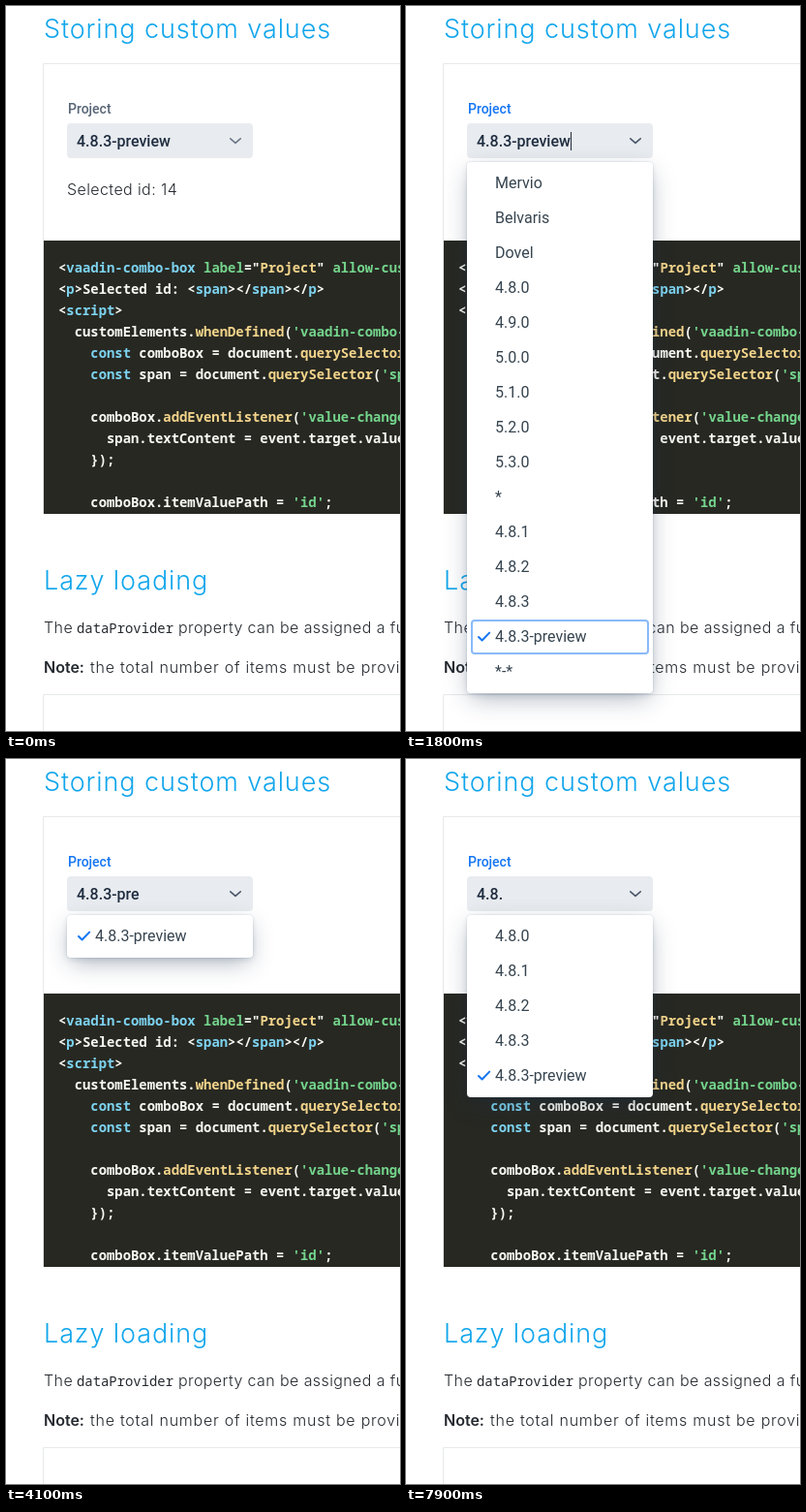
An HTML page for the animation above (8000 ms loop, 407 by 748 pixels).

```html
<!DOCTYPE html>
<html lang="en">
<head>
<meta charset="utf-8">
<title>Storing custom values</title>
<style>
html, body { margin: 0; width: 100%; height: 100%; overflow: hidden; background: #fff; }
#stage { position: relative; width: 407px; height: 748px; overflow: hidden; }
svg { position: absolute; left: 0; top: 0; }
text { white-space: pre; }
.h { font: 300 27px Inter, sans-serif; letter-spacing: .9px; fill: #12a6ec; }
.b { font: 300 16px Inter, sans-serif; letter-spacing: .4px; fill: #24292f; }
.wide { letter-spacing: .75px; }
.strong { font-weight: 600; letter-spacing: 0; }
.mono { font: 300 13.9px "Noto Sans Mono", monospace; letter-spacing: 0; }
.code { fill: #f8f8f2; font-weight: 600; }
.t { fill: #7dd3f0; }
.g { fill: #74d48c; }
.y { fill: #f3d48b; }
#label { font: 500 14px Roboto, sans-serif; }
#value { font: 500 16px Roboto, sans-serif; fill: #1f2d40; }
#list {
  position: absolute; left: 63px; top: 161px; width: 192px; padding: 4px 0;
  box-sizing: border-box; border-radius: 4px; background: #fff;
  box-shadow: 0 0 0 1px hsla(214,61%,25%,.05), 0 2px 6px -1px hsla(214,53%,23%,.16),
    0 8px 24px -4px hsla(214,47%,21%,.38);
}
#list div {
  position: relative; height: 36px; margin: 0 4px; padding-left: 25px; border-radius: 4px;
  font: 16px/36px Roboto, sans-serif; color: #36444f; white-space: pre;
}
#list .focus { box-shadow: inset 0 0 0 2px #8abaf9; }
#list svg { left: 6px; top: 10px; }
</style>
</head>
<body>
<div id="stage">
<svg width="407" height="748">
  <text class="h" x="39" y="33">Storing custom values</text>
  <path d="M420 59.5H38.5V524M420 710.5H38.5V760" fill="none" stroke="#e6e8ea"/>
  <text id="label" x="64" y="111">Project</text>
  <rect id="field" x="63" y="121" width="192" height="36" rx="4"/>
  <text id="value" x="73" y="145"></text>
  <rect id="caret" y="130" width="1" height="19" fill="#1f2d40"/>
  <path id="arrow" d="M231.8 136.8L237 141.4L242.2 136.8" fill="none" stroke-width="1.6" stroke-linecap="round" stroke-linejoin="round"/>
  <text class="b" x="63" y="195">Selected id: 14</text>
  <rect x="39" y="242" width="368" height="282" fill="#272822"/>
  <g id="code" class="mono code"></g>
  <text class="h" x="39" y="602">Lazy loading</text>
  <text class="b" x="39" y="647">The</text>
  <text class="b mono" x="73" y="647">dataProvider</text>
  <text class="b" x="178" y="647">property can be assigned a function</text>
  <text class="b wide" y="688"><tspan class="strong" x="39">Note:</tspan><tspan x="87">the total number of items must be provided</tspan></text>
</svg>
<div id="list"></div>
</div>
<script>
const $ = id => document.getElementById(id);

// Markup for the code block: {t tag}, {g green}, {y yellow}
const code = `<{t vaadin-combo-box} {g label}="{y Project}" {g allow-custom-value}>
<{t p}>Selected id: <{t span}></{t span}></{t p}>
<{t script}>
  customElements.{y whenDefined}({g 'vaadin-combo-box'})
    {t const} comboBox = document.{y querySelector}(
    {t const} span = document.{y querySelector}({g 'span'})

    comboBox.{y addEventListener}({g 'value-changed'},
      span.textContent = event.target.value;
    });

    comboBox.itemValuePath = {g 'id'};`;
$('code').innerHTML = code.split('\n').map((line, i) => {
  const body = line.replace(/</g, '&lt;').replace(/\{([tgy]) ([^}]*)\}/g, '<tspan class="$1">$2</tspan>');
  return `<text x="54" y="${275 + i * 22}">${body}</text>`;
}).join('');

const full = '4.8.3-preview';
const all = ['Mervio', 'Belvaris', 'Dovel', '4.8.0', '4.9.0', '5.0.0', '5.1.0', '5.2.0',
  '5.3.0', '*', '4.8.1', '4.8.2', '4.8.3', full, '*-*'];
const check = '<svg width="16" height="16"><path d="M2 8L5.6 11.5L13.2 3.6" fill="none" stroke="#1676f3" stroke-width="2" stroke-linecap="round" stroke-linejoin="round"/></svg>';

const deletions = [3300, 3700, 3900, 4000, 4300, 4500, 4700, 5000, 6900];
const caretFlips = [1600, 2100, 2600, 3100, 3600, 4100, 4500, 5000, 5500, 6000, 6500, 6900, 7400, 7900];

const clamp = v => Math.max(0, Math.min(1, v));
const mix = (a, b, p) => `color-mix(in srgb, ${b} ${p * 100}%, ${a})`;
const passed = (times, t) => times.filter(s => s <= t).length;
const typed = t => full.slice(0, full.length - passed(deletions, t));

let shown;
function fillList(query) {
  if (query === shown) return;
  shown = query;
  const items = query === full ? all : all.filter(s => s.startsWith(query)).sort();
  $('list').innerHTML = items.map(s =>
    `<div class="${s === query ? 'focus' : ''}">${s === full ? check : ''}${s}</div>`).join('');
}

function draw(now) {
  const t = Math.floor(now % 8000 / 100) * 100; // ten steps a second
  const hover = clamp((t - 600) / 300);
  const focus = t < 1700 ? 0 : t < 1800 ? .68 : 1;

  $('label').style.fill = mix(mix('#596676', '#1c2b3f', hover), '#1676f3', focus);
  $('field').style.fill = mix('#e8ebef', '#dde1e7', hover * (1 - focus));
  $('arrow').style.stroke = mix('#6b7888', '#4a5769', clamp((t - 1100) / 200));

  $('value').textContent = typed(t);
  $('caret').setAttribute('x', 73 + Math.round($('value').getComputedTextLength()));
  $('caret').style.opacity = passed(caretFlips, t) % 2;

  fillList(typed(t - 100));
  $('list').style.opacity = focus;
  $('list').style.transform = `translateY(${-4 * (1 - focus)}px)`;
  requestAnimationFrame(draw);
}
draw(0);
</script>
</body>
</html>
```
